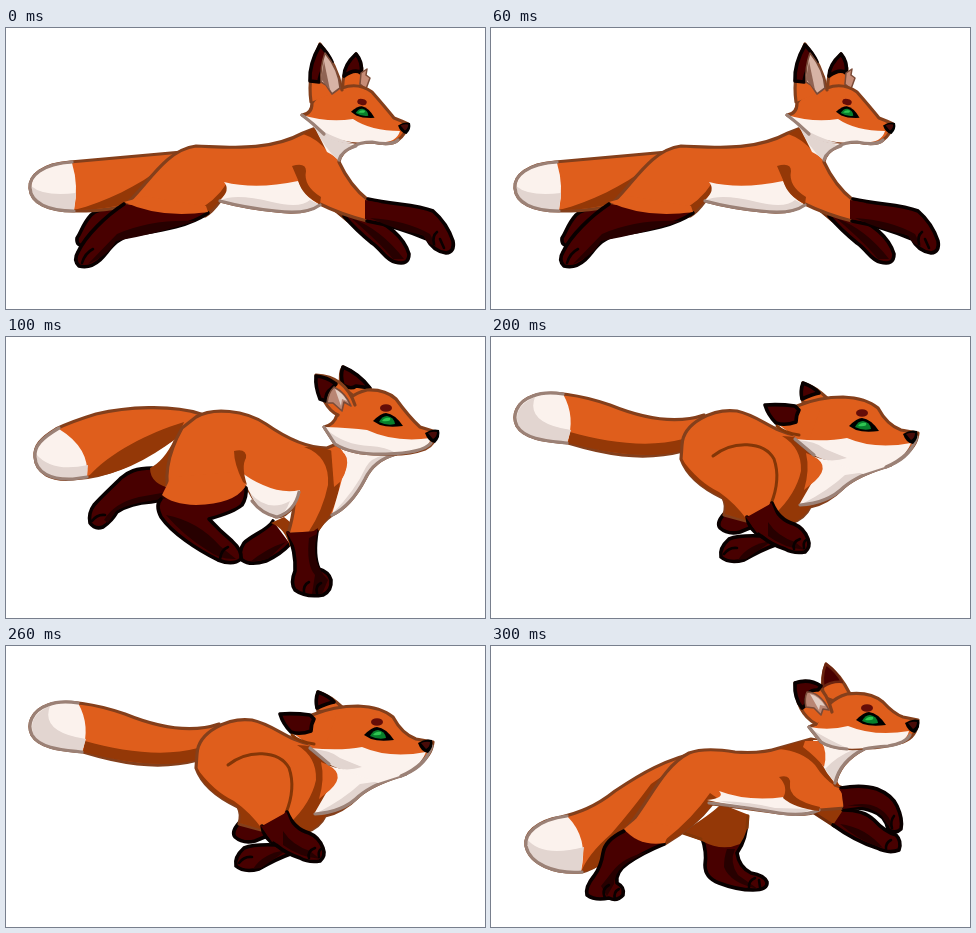
An HTML page for the animation above (0.4 s loop, 479 px wide and 281 px high).

```html
<!DOCTYPE html>
<html lang="en">
<head>
<meta charset="utf-8">
<title>Running fox</title>
<style>
html, body { margin: 0; width: 100%; height: 100%; overflow: hidden; background: #fff; }
svg { display: block; width: 100vw; height: 100vh; }
path { stroke-linejoin: round; stroke-linecap: round; }
.pose { display: none; }
.o { fill: #df5e1c; stroke: #843f1b; stroke-width: 3.2; }
.of { fill: #df5e1c; }
.s { fill: #943807; }
.so { fill: #943807; stroke: #6f2c0a; stroke-width: 3; }
.d { fill: #480000; stroke: #090000; stroke-width: 3.6; }
.dd { fill: #270000; }
.df { fill: #480000; }
.w { fill: #fbf2ed; }
.g { fill: #e2d5d0; }
.l { fill: none; stroke: #843607; stroke-width: 3; }
.k { fill: none; stroke: #9b8176; stroke-width: 3.2; }
.b { fill: none; stroke: #090000; stroke-width: 2.6; }
</style>
</head>
<body>
<svg viewBox="0 0 479 281" preserveAspectRatio="none">
<defs>
  <g id="eye">
    <path d="M-15 1Q-7 -7 -2 -7Q7 -6 15 6Q1 8 -8 5Z"/>
    <path fill="#087f2c" d="M-9 2Q-6 -4 -1 -4Q6 -3 7 4Q-1 6 -9 2Z"/>
    <path fill="#2fc552" d="M-6 1Q-3 -3 2 -2Q4 2 -6 1Z"/>
  </g>
  <g id="nose">
    <path d="M-7 -3Q0 -8 7 -6Q9 1 3 7Q-4 6 -7 -3Z"/>
    <path fill="#480b08" d="M-4 -3Q1 -5 5 -4Q5 1 1 3Z"/>
  </g>
  <ellipse id="brow" rx="6" ry="3.8" fill="#650d08"/>
</defs>

<!-- full stretch -->
<g class="pose">
  <path class="d" d="M122 177C104 181 92 180 85 187C76 197 75 205 71 210Q70 219 79 217C95 211 110 201 126 195"/>
  <path class="o" d="M176 124C140 127 100 131 64 134C36 136 23 148 24 160C25 175 42 183 68 183C98 183 120 181 150 166Z"/>
  <path class="s" d="M68 182C100 174 132 158 158 138L144 166Q115 182 68 182Z"/>
  <path class="w" d="M66 135C36 137 25 148 25 160C26 175 42 182 68 182Q73 158 66 135Z"/>
  <path class="g" d="M25 158Q38 169 70 165L68 182Q28 182 25 158Z"/>
  <path class="k" d="M66 134C36 136 23 148 24 160C25 175 42 183 68 183"/>
  <path class="so" d="M318 173Q340 167 364 188L342 193Z"/>
  <path class="d" d="M362 189C381 195 398 209 403 226Q403 238 389 234C380 232 376 222 366 215Q350 202 338 188"/>
  <path class="dd" d="M345 190Q375 201 398 231L387 231Q375 216 345 190Z"/>
  <path class="o" d="M337 62Q335 43 350 26Q359 39 355 58Z"/>
  <path class="d" d="M338 48Q338 37 350 26Q357 34 355 45Q349 40 338 48Z"/>
  <path fill="#c88d77" stroke="#7a4b38" stroke-width="1.5" d="M355 45L361 41L360 47L364 50L360 61L354 56Z"/>
  <path class="o" d="M118 178C140 160 158 122 190 118C222 119 262 124 297 105L320 96L348 118Q334 124 333 134Q344 158 362 172L361 193Q334 186 314 176Q300 187 270 183Q240 180 214 173Q206 184 199 188Q160 190 118 178Z"/>
  <path class="s" d="M188 184Q209 174 221 155L226 158Q213 175 200 187Z"/>
  <path class="w" d="M214 172Q225 162 218 154Q250 162 292 153Q298 168 314 177Q300 187 270 183Q240 180 214 172Z"/>
  <path class="g" d="M215 172Q230 165 266 174Q294 181 304 172L314 177Q300 186 270 183Q240 180 215 172Z"/>
  <path class="k" d="M214 173Q240 180 270 183Q300 187 314 177"/>
  <path class="s" d="M286 138Q300 134 300 143Q297 158 315 169L314 176Q296 168 292 152Z"/>
  <path class="s" d="M297 106Q312 111 322 124L327 118L310 99Z"/>
  <path class="w" d="M308 98L321 124Q329 128 333 133Q336 122 350 118L330 98Z"/>
  <path class="g" d="M308 98Q318 120 333 133Q337 121 347 118Z"/>
  <path class="k" d="M333 132Q336 122 350 118"/>
  <path class="d" d="M202 185C180 200 150 203 126 207C108 211 104 222 94 232Q84 241 73 238Q67 232 72 224C80 207 100 188 118 176"/>
  <path class="dd" d="M190 193Q145 191 111 206L82 236Q103 227 110 213Q150 206 190 193Z"/>
  <path class="of" d="M118 174Q155 191 202 184L200 178L140 168Z"/>
  <path class="b" d="M76 235Q79 225 87 221"/>
  <path class="d" d="M362 171C389 177 410 176 427 183Q441 195 447 213Q449 224 440 225Q427 223 421 211C404 204 384 197 361 193"/>
  <path class="df" d="M359 172L375 175L375 194L359 191Z"/>
  <path class="dd" d="M364 190Q399 192 424 206L430 218Q421 217 417 207Q392 203 364 190Z"/>
  <path class="b" d="M428 216Q426 208 431 204M438 220L434 211"/>
  <path class="o" d="M306 75Q314 62 336 60Q352 54 366 64Q380 80 388 90Q396 93 402 96Q400 106 392 112Q386 118 366 114Q340 117 318 106Q310 96 296 87Q306 86 306 75Z"/>
  <path class="w" d="M296 87Q322 95 347 91Q365 103 394 103Q390 117 366 114Q340 117 318 106Q308 96 296 87Z"/>
  <path class="g" d="M297 88Q312 104 340 113L350 116Q327 116 313 105Z"/>
  <path class="k" d="M392 112Q386 118 366 114Q354 114 346 119M318 106Q308 96 296 87"/>
  <path class="o" d="M305 74Q301 46 314 16Q331 37 336 62"/>
  <path class="d" d="M304 53Q303 36 314 17Q322 25 326 34Q315 38 313 54Z"/>
  <path fill="#d7b3a5" stroke="#7a4b38" stroke-width="1.6" d="M319 25Q333 42 334 60L326 66L320 57L315 54Q314 39 319 25Z"/>
  <path fill="#8f6353" d="M318 33L324 62L315 51Z"/>
  <use href="#brow" transform="translate(356 74) rotate(12) scale(.8)"/>
  <use href="#eye" transform="translate(357 84) rotate(5) scale(.8)"/>
  <use href="#nose" transform="translate(398 100) scale(.85)"/>
</g>

<!-- gathering -->
<g class="pose">
  <path class="o" d="M195 77C165 67 120 70 90 77Q64 85 50 92C35 101 28 109 29 120C30 136 45 144 67 142C105 140 133 124 170 100Z"/>
  <path class="s" d="M81 141C104 115 142 96 178 85L172 100Q124 137 81 141Z"/>
  <path class="w" d="M53 92C36 101 29 109 30 120C31 136 45 143 67 142L81 140Q84 111 53 92Z"/>
  <path class="g" d="M30 117Q46 136 82 128L81 140Q32 148 30 117Z"/>
  <path class="k" d="M53 91C36 101 28 109 29 120C30 136 45 143 67 142L81 140"/>
  <path class="d" d="M146 131C130 131 122 135 115 141C105 151 96 159 88 168Q82 176 84 186Q89 193 97 190Q106 184 111 175Q125 166 145 165L168 161"/>
  <path class="so" style="stroke:none" d="M168 103Q158 124 144 131Q144 148 168 152Z"/>
  <path class="dd" d="M98 183Q108 166 133 160L167 154L166 161Q125 165 110 174L102 186Z"/>
  <path class="b" d="M86 184Q91 177 99 178"/>
  <path class="d" d="M267 184C262 193 246 198 238 206Q232 215 236 223Q244 229 260 224Q275 217 284 207"/>
  <path class="s" d="M265 186L278 180L290 190L284 210Q279 191 265 186Z"/>
  <path class="dd" d="M244 225Q261 211 280 205L262 222Z"/>
  <path class="o" d="M335 49Q333 36 337 30Q352 37 364 51L350 61Z"/>
  <path class="d" d="M337 48Q334 38 337 30Q352 36 364 51L350 49Q345 53 337 48Z"/>
  <path class="o" d="M190 80C207 70 239 73 260 87C280 101 300 111 321 111L340 103L390 117Q368 123 359 142Q345 169 326 178Q315 186 310 196L282 197Q287 180 288 168Q280 180 270 180Q251 173 241 149Q240 162 225 167Q190 171 165 165Q153 132 176 91Z"/>
  <path class="s" d="M298 110Q320 109 330 116Q341 145 324 178L311 197L302 196Q317 173 322 148Q324 119 298 110Z"/>
  <path class="w" d="M329 106Q348 122 336 142Q332 157 326 177Q345 169 359 142Q368 123 390 117Z"/>
  <path class="of" d="M325 111Q352 114 334 145L328 150Z"/>
  <path class="g" d="M326 177Q349 154 360 130Q365 121 378 118L387 118Q368 122 359 142Q345 169 326 177Z"/>
  <path class="k" d="M326 178Q345 169 359 142Q368 123 390 117"/>
  <path class="w" d="M234 134Q243 142 257 148Q277 157 294 153Q290 172 272 180Q251 173 240 148Z"/>
  <path class="g" d="M244 156Q262 176 284 164Q279 178 271 180Q251 174 244 156Z"/>
  <path class="k" d="M246 164Q256 177 271 180Q289 174 293 155"/>
  <path class="s" d="M228 114Q241 111 240 121Q235 129 241 148L237 145Q228 127 228 114Z"/>
  <path class="d" d="M155 162Q149 168 155 180C166 196 190 212 212 223Q227 229 235 222Q236 213 226 204Q214 194 203 182Q228 175 236 168Q241 160 240 151"/>
  <path class="of" d="M156 158Q166 167 190 168Q228 167 239 150L225 135L165 140Z"/>
  <path class="dd" d="M160 178Q192 184 214 209L230 222Q214 223 201 213Q178 199 160 178Z"/>
  <path class="b" d="M214 222Q215 213 222 210"/>
  <path class="d" d="M282 196Q290 215 289 234Q284 246 289 253Q300 261 317 258Q326 254 325 243Q323 235 313 232Q307 219 311 194"/>
  <path class="df" d="M280 194Q297 203 312 191L308 210L290 212Z"/>
  <path class="dd" d="M303 201Q300 228 309 238L306 257L316 257L322 243Q304 225 311 197Z"/>
  <path class="b" d="M298 256Q297 248 303 245M311 256Q309 249 315 246"/>
  <path class="o" d="M331 78Q340 58 361 53Q379 52 390 62Q403 80 414 90L430 95Q430 107 419 112Q403 118 380 117Q346 118 329 107L318 90Q328 88 331 78Z"/>
  <path class="w" d="M319 90Q345 91 361 93Q389 106 425 101Q423 111 410 115Q395 117 380 117Q346 118 329 107Z"/>
  <path class="g" d="M320 92Q338 108 364 109Q380 110 390 116Q346 119 329 107Z"/>
  <path class="k" d="M425 106Q417 116 380 117Q346 118 329 107L318 90"/>
  <path class="o" d="M332 78Q316 71 310 38Q339 39 349 68"/>
  <path class="d" d="M314 62Q309 50 310 39Q321 40 330 47L325 52Q319 56 320 64Z"/>
  <path fill="#b98674" stroke="#7a4b38" stroke-width="1.6" d="M328 50Q340 56 345 69L338 65L336 74L327 66L321 66Q322 56 328 50Z"/>
  <path fill="#e2cdc3" d="M329 52Q337 56 341 64L336 62L335 69Z"/>
  <use href="#brow" x="380" y="71"/>
  <use href="#eye" x="382" y="83"/>
  <use href="#nose" x="426" y="99"/>
</g>

<!-- legs crossed -->
<g class="pose">
  <path class="o" d="M213 78C181 89 146 79 119 68C90 58 60 53 42 59C25 65 21 79 26 89C34 103 59 104 77 106C110 116 150 125 192 114Z"/>
  <path class="s" d="M79 95C117 106 160 111 192 102L191 114Q150 125 77 106Z"/>
  <path class="w" d="M72 57Q53 55 42 60C26 65 22 79 27 89C35 102 59 103 76 106Q85 80 72 57Z"/>
  <path class="g" d="M44 60Q34 86 80 93L76 106Q35 102 28 91Q20 70 44 60Z"/>
  <path class="k" d="M72 57Q54 54 42 59C25 65 21 79 26 89C34 103 59 104 76 106"/>
  <path class="d" d="M233 177Q225 186 229 191Q237 198 249 195L266 188L254 171Z"/>
  <path class="d" d="M270 199Q248 198 238 202Q228 211 230 220Q238 227 253 223Q270 213 287 207Z"/>
  <path class="dd" d="M247 223Q257 207 281 204L255 222Z"/>
  <path class="b" d="M233 217Q238 210 246 211"/>
  <path class="o" d="M312 65Q309 56 312 46Q325 50 337 62L326 70Z"/>
  <path class="d" d="M311 62Q309 54 312 46Q323 50 328 56Q322 57 311 62Z"/>
  <path class="o" d="M191 108C192 86 222 71 246 74C269 79 280 94 307 99L392 111L400 128Q367 138 353 150Q337 166 319 170Q314 181 300 186L282 177L259 185L233 178Q236 168 232 161Q198 145 190 122Z"/>
  <path class="s" d="M190 121Q207 145 228 155Q244 166 257 184L234 177Q236 167 231 160Q198 146 190 121Z"/>
  <path class="s" d="M291 99Q307 99 316 105Q331 143 311 167L320 169Q312 183 300 186L284 177Q305 157 310 134Q311 111 291 99Z"/>
  <path class="w" d="M310 103Q330 125 323 142L308 168Q337 166 353 150Q367 138 404 127L360 105Z"/>
  <path class="of" d="M315 116Q343 126 324 144L313 153Q319 133 315 116Z"/>
  <path class="g" d="M311 167Q338 153 354 138L375 135Q358 145 351 153Q334 168 311 167Z"/>
  <path class="k" d="M309 168Q337 166 353 150Q367 138 395 130Q417 122 424 105"/>
  <path class="l" d="M222 119C242 103 273 104 283 122Q290 142 280 167"/>
  <path class="d" d="M256 180Q257 192 270 199Q281 208 294 212Q303 217 314 215Q320 210 317 202Q313 191 303 187Q288 183 281 166"/>
  <path class="df" d="M254 179Q270 184 280 165L288 184L266 196Z"/>
  <path class="dd" d="M277 185Q286 199 304 205L314 213Q293 211 277 199Z"/>
  <path class="b" d="M303 212Q301 205 309 202M313 211Q312 205 315 203"/>
  <path class="o" d="M306 69Q328 60 352 60Q375 61 387 71Q396 88 410 93L427 96Q425 111 413 116L390 126Q348 126 323 118L304 103"/>
  <path class="w" d="M303 102Q335 105 356 101Q384 113 420 106Q416 117 403 127L372 137L330 121Z"/>
  <path class="g" d="M305 103Q325 104 334 112Q346 117 356 121Q336 127 323 118Z"/>
  <path class="k" d="M426 100Q420 119 395 130M323 118L304 102"/>
  <path class="of" d="M303 99L284 85L302 70L330 70L318 103Z"/>
  <path class="d" d="M285 86Q277 78 274 68Q289 67 304 69L308 73Q305 78 305 85Q294 89 285 86Z"/>
  <path class="l" d="M286 89Q293 96 308 98"/>
  <use href="#brow" x="371" y="76"/>
  <use href="#eye" x="373" y="88"/>
  <use href="#nose" x="419" y="100"/>
</g>

<!-- pushing off -->
<g class="pose">
  <path class="o" d="M213 105C175 112 148 129 124 145C104 161 87 167 70 171C45 175 33 188 35 200C39 218 63 228 91 226Q114 219 131 196L180 145Z"/>
  <path class="s" d="M90 226Q97 208 120 188Q140 165 160 138L196 113L137 191Q116 223 90 226Z"/>
  <path class="w" d="M76 170C46 175 34 188 36 200C40 217 63 227 90 225Q98 192 76 170Z"/>
  <path class="g" d="M36 193Q51 212 93 201L90 225Q37 227 36 193Z"/>
  <path class="k" d="M76 170C46 174 33 188 35 200C39 218 63 228 91 226"/>
  <path class="d" d="M211 192Q216 206 214 219Q214 232 228 237Q246 244 262 244Q277 244 276 236Q273 229 260 227Q248 221 246 207Q256 193 256 172"/>
  <path class="s" d="M190 187Q222 167 230 158L258 169Q257 187 249 198Q231 206 211 195Z"/>
  <path class="l" d="M192 187L210 193M257 170L256 182"/>
  <path class="dd" d="M244 203Q238 216 247 229L267 243Q239 237 233 221Q233 211 236 203Z"/>
  <path class="b" d="M258 242Q257 235 264 232M269 241L268 234"/>
  <path class="so" d="M320 165L351 158L366 165L343 180Z"/>
  <path class="d" d="M352 164Q373 164 383 174Q394 186 405 189Q411 195 408 204Q398 208 386 202Q364 195 342 179"/>
  <path class="dd" d="M349 178Q374 181 392 202Q369 196 349 178Z"/>
  <path class="b" d="M395 204Q394 197 400 194"/>
  <path class="o" d="M332 51Q330 30 335 18Q349 28 359 48L351 58Z"/>
  <path class="d" style="stroke:#6a2410;stroke-width:2.5" d="M332 37Q331 27 335 18Q346 26 351 36Q341 35 332 41Z"/>
  <path class="o" d="M134 184C156 161 170 121 198 107Q214 101 244 106Q270 108 288 102L320 93L373 103Q348 116 344 139L352 142L354 162L329 164Q316 171 288 167Q246 161 221 158Q204 180 174 198Q148 201 134 184Z"/>
  <path class="s" d="M174 194Q202 172 219 147L226 152Q210 178 174 198Z"/>
  <path class="w" d="M216 154Q235 152 228 145Q257 156 293 151Q304 160 329 164Q316 171 288 167Q246 161 216 154Z"/>
  <path class="g" d="M228 155Q261 156 284 162L320 163Q309 171 288 167Z"/>
  <path class="k" d="M218 157Q246 160 288 167Q312 171 328 164"/>
  <path class="s" d="M288 131Q300 128 299 138Q297 154 329 161L328 165Q303 162 292 152Q298 141 288 131Z"/>
  <path class="s" d="M288 103Q311 105 324 119Q333 133 344 140L349 140L333 115L320 94Q305 95 288 103Z"/>
  <path class="w" d="M322 94Q328 119 343 136Q349 115 373 103L345 94Z"/>
  <path class="of" d="M314 95L330 95Q337 106 333 121Q325 111 312 101Z"/>
  <path class="g" d="M334 123Q346 110 364 103L373 103Q350 115 344 137Z"/>
  <path class="k" d="M344 137Q349 115 373 103"/>
  <path class="d" d="M133 185Q114 194 112 207Q110 221 103 230Q94 241 96 249Q104 255 118 252Q126 256 132 249Q134 241 126 237Q124 226 137 217Q151 207 173 198"/>
  <path class="dd" d="M156 206Q132 211 121 226L110 240L116 250L123 238Q124 224 139 215Z"/>
  <path class="of" d="M133 183Q148 201 174 197L180 180L145 173Z"/>
  <path class="b" d="M114 252Q110 243 118 239M124 253Q122 246 128 243"/>
  <path class="d" d="M350 142Q371 138 386 143Q401 149 406 160Q412 173 410 183Q404 189 397 183Q394 169 381 165Q369 160 353 163"/>
  <path class="df" d="M348 143Q356 152 352 163L375 160L375 145Z"/>
  <path class="dd" d="M356 160Q385 153 398 172L402 183Q395 179 391 170Q376 158 356 160Z"/>
  <path class="b" d="M401 182Q399 175 403 170"/>
  <path class="o" d="M325 78Q335 54 356 48Q379 45 392 56Q403 68 412 71L427 74Q426 91 412 96Q393 102 375 102Q345 105 330 96L318 81Z"/>
  <path class="w" d="M319 81Q338 85 357 80Q384 91 418 85Q415 97 400 99Q386 102 375 102Q345 105 330 96Z"/>
  <path class="g" d="M320 83Q336 93 356 102Q338 102 330 96Z"/>
  <path class="k" d="M419 89Q415 97 397 100Q382 101 373 103M356 103Q339 102 330 96L318 81"/>
  <path class="o" d="M325 78Q305 67 304 37Q331 28 341 66"/>
  <path class="d" d="M311 62Q303 52 304 37Q318 32 330 40L327 44Q314 43 315 59Z"/>
  <path fill="#b98674" stroke="#7a4b38" stroke-width="1.6" d="M316 46Q329 46 338 64L332 63L330 69L323 62L315 61Q313 53 316 46Z"/>
  <path fill="#e2cdc3" d="M319 48Q328 50 334 60L329 59L328 64Z"/>
  <use href="#brow" x="376" y="62"/>
  <use href="#eye" x="380" y="73"/>
  <use href="#nose" x="421" y="80"/>
</g>
</svg>
<script>
const STEP = 100;
const poses = [...document.querySelectorAll('.pose')];

function draw(ms) {
  const now = Math.floor(ms / STEP) % poses.length;
  poses.forEach((pose, i) => { pose.style.display = i === now ? 'inline' : 'none'; });
}

function tick() {
  draw(performance.now());
  requestAnimationFrame(tick);
}
tick();
</script>
</body>
</html>
```
